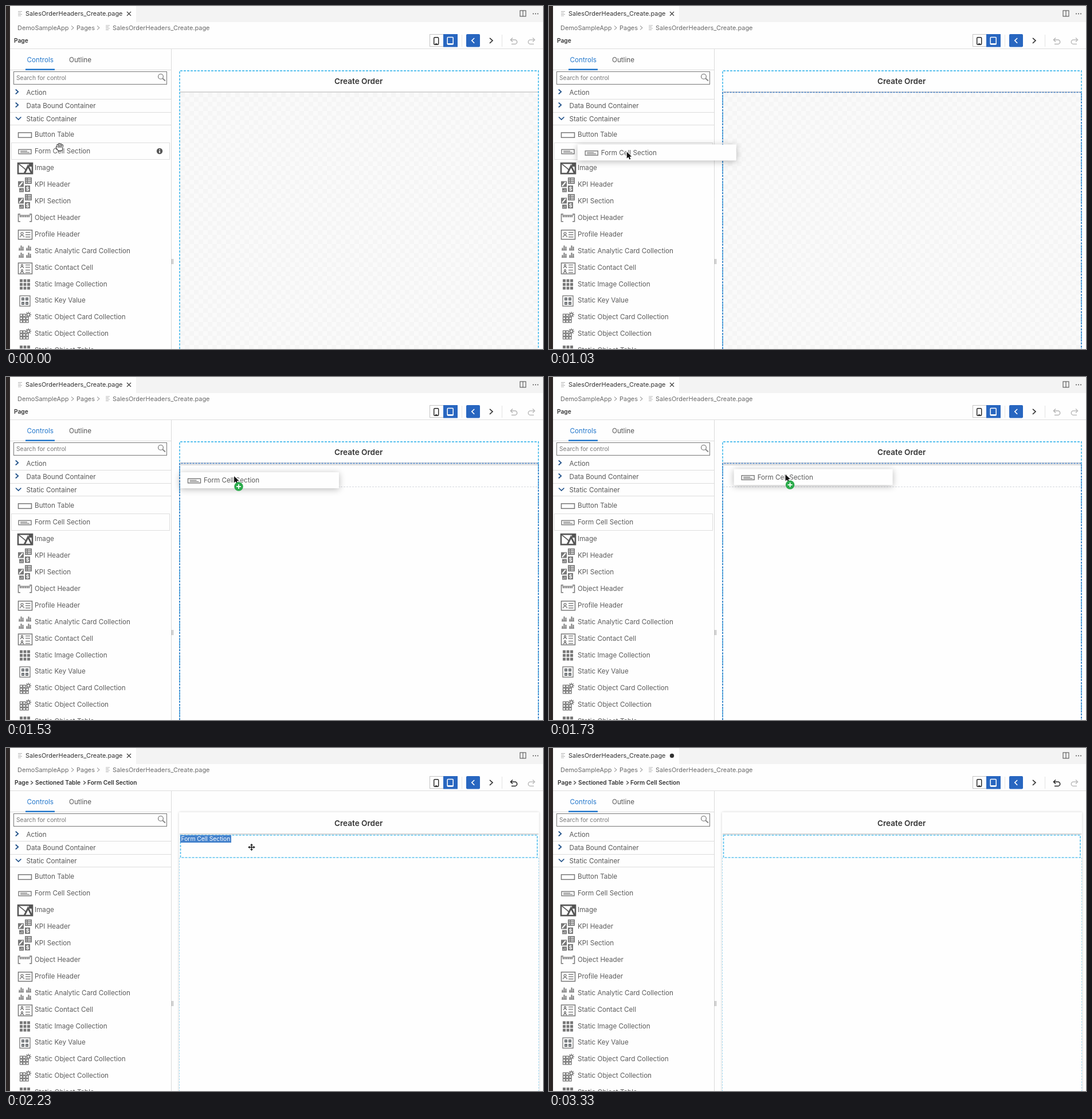
An HTML page with a canvas that plays this animation: 937 px wide and 598 px high, repeating every 3430 ms.

```html
<!DOCTYPE html>
<html lang="en">
<head>
<meta charset="utf-8">
<title>Page designer</title>
<style>
html, body { margin: 0; width: 100%; height: 100%; overflow: hidden; background: #fefefe; }
canvas { display: block; }
</style>
</head>
<body>
<canvas id="stage" width="937" height="598"></canvas>
<script>
const c = document.getElementById('stage').getContext('2d');
const LOOP = 3430, GRAY = '#787878', SKY = '#5cc2ee', BLUE = '#2866c0', LABEL = 11.66;
const T = { grab: 900, target: 930, over: 1430, drop: 2130, dirty: 2830, leave: 3130 };

const items = ['Button Table', 'Form Cell Section', 'Image', 'KPI Header', 'KPI Section',
  'Object Header', 'Profile Header', 'Static Analytic Card Collection', 'Static Contact Cell',
  'Static Image Collection', 'Static Key Value', 'Static Object Card Collection',
  'Static Object Collection', 'Static Object Table'];
const icons = [buttonIcon, formIcon, imageIcon, kpiIcon, kpiIcon, headerIcon, profileIcon,
  chartsIcon, contactIcon, gridIcon, keyIcon, gearGridIcon, gearGridIcon, gridIcon];

// Motion paths: [time, x, y]
const handPath = [[30, 94, 246], [430, 97, 253.5]];
const tipPath = [[860, 95, 252], [1260, 199, 258], [1530, 398, 173], [1930, 427, 167]];
const chipPath = [[860, 9, 239], [1260, 113, 245], [1530, 304, 166], [1930, 341, 155]];

function along(path, t) {
  if (t <= path[0][0]) return path[0].slice(1);
  for (let i = 1; i < path.length; i++) {
    const [t0, x0, y0] = path[i - 1], [t1, x1, y1] = path[i];
    if (t < t1) {
      const k = (t - t0) / (t1 - t0), e = k * k * (3 - 2 * k);
      return [x0 + (x1 - x0) * e, y0 + (y1 - y0) * e];
    }
  }
  return path[path.length - 1].slice(1);
}

function box(x, y, w, h, color) { c.fillStyle = color; c.fillRect(x, y, w, h); }
function frame(x, y, w, h, color, width = 1) {
  c.strokeStyle = color; c.lineWidth = width; c.strokeRect(x, y, w, h);
}
function line(points, color, width = 1, dash = []) {
  c.strokeStyle = color; c.lineWidth = width;
  c.setLineDash(dash);
  c.beginPath();
  for (let i = 0; i < points.length; i += 2) c.lineTo(points[i], points[i + 1]);
  c.stroke();
  c.setLineDash([]);
}
function disc(x, y, r, color) {
  c.fillStyle = color;
  c.beginPath(); c.arc(x, y, r, 0, 7); c.fill();
}
function ring(x, y, r, color, width, from = 0, to = 7) {
  c.strokeStyle = color; c.lineWidth = width;
  c.beginPath(); c.arc(x, y, r, from, to); c.stroke();
}
function text(s, x, mid, size, color, weight = 400) {
  c.font = `${weight} ${size}px Inter, "Liberation Sans", sans-serif`;
  c.fillStyle = color;
  c.fillText(s, x, mid + size * 0.36);
}
function chevron(x, y, w, h, color, width = 1.5) {
  line([x - w / 2, y - h, x + w / 2, y, x - w / 2, y + h], color, width);
}
function rounded(x, y, w, h, r, color) {
  c.fillStyle = color;
  c.beginPath(); c.roundRect(x, y, w, h, r); c.fill();
}

// Control icons, drawn around the origin
function buttonIcon() { frame(-11.5, -3.5, 23, 8.5, GRAY, 1.5); }
function formIcon() {
  frame(-11, -3, 22, 7.5, GRAY, 1.4);
  line([-8, -.2, 4, -.2], GRAY, 1.2);
  line([-8, 2, 8, 2], GRAY, 1.2);
}
function imageIcon() {
  frame(-12, -8, 25, 18, '#555', 2.6);
  box(7, -8, 6, 6, '#555');
  line([-1, 10, 5.5, -3, 12, 10], '#555', 3);
  line([-11, -7, -1, 1, 2, 4], '#555', 1.5);
}
function kpiIcon() {
  box(0, -12, 12, 11, GRAY);
  for (let y = -9.5; y < -2; y += 3) {
    line([1.5, y, 3.5, y], '#fff', 1.3);
    line([5, y, 10.5, y], '#fff', 1.3);
  }
  box(-12, -5.5, 10, 10, GRAY);
  line([-10, 3, -4, -4], '#fff', 2);
  box(0, 2, 9, 11, GRAY);
  text('$', 1.7, 7.5, 9, '#fff', 700);
  box(-10, 6.5, 8, 7, GRAY);
  line([-8, 12, -8, 10], '#fff');
  line([-5, 12, -5, 8.5], '#fff');
}
function headerIcon() {
  line([-8, -6, -11.5, -6, -11.5, 7, -8, 7], GRAY, 1.5);
  line([8, -6, 11.5, -6, 11.5, 7, 8, 7], GRAY, 1.5);
  line([-9, -2, 9, -2], GRAY, 3, [2, 1]);
  line([-10, -4, 10, -4], GRAY, 1);
}
function person(x, y, s = 1) {
  ring(x, y - 2 * s, 2 * s, GRAY, 1.3);
  ring(x, y + 4.5 * s, 3.4 * s, GRAY, 1.3, Math.PI, 2 * Math.PI);
}
function profileIcon() {
  frame(-11.5, -7, 24, 16, GRAY, 1.5);
  person(-5, 1);
  for (const y of [-3, 1, 5]) line([1, y, 9.5, y], GRAY, 1.4);
}
function chartsIcon() {
  for (const x of [-11, 2]) for (const y of [-1, 11.5]) {
    line([x, y, x + 9, y], GRAY, 1.2);
    [4, 8, 6].forEach((h, i) => box(x + .5 + i * 3, y - h, 2, h, GRAY));
  }
}
function contactIcon() {
  frame(-11.5, -7.5, 24, 19, GRAY, 1.5);
  for (const y of [-2, 7]) {
    person(-5, y, .75);
    line([1, y - 2, 9, y - 2], GRAY, 1.3);
    line([1, y + 2, 9, y + 2], GRAY, 1.3);
  }
}
function gridIcon() {
  for (let i = 0; i < 9; i++) box(-9 + i % 3 * 6.5, -8 + (i / 3 | 0) * 6.5, 5, 5, GRAY);
}
function keyIcon() {
  frame(-9, -8, 18, 18, GRAY, 1.3);
  for (const x of [-6, 1]) for (const y of [-5, 2.5]) {
    box(x, y, 5, 5, '#5f6468');
    box(x + 1, y + 2, 3, 1, '#ddd');
  }
}
function gearGridIcon() {
  for (let i = 0; i < 9; i++) {
    if (i !== 2) frame(-8.5 + i % 3 * 5.3, -5 + (i / 3 | 0) * 5.3, 4, 4, GRAY, 1.3);
  }
  for (let a = 0; a < 8; a++) {
    const x = Math.cos(a * Math.PI / 4), y = Math.sin(a * Math.PI / 4);
    line([6 + 3 * x, -4 + 3 * y, 6 + 5.2 * x, -4 + 5.2 * y], GRAY, 1.3);
  }
  ring(6, -4, 2.5, GRAY, 1.5);
}
function icon(draw, x, y) {
  c.save(); c.translate(x, y); draw(); c.restore();
}

function fileIcon(x, y) {
  [7, 5, 7, 5].forEach((w, i) => line([x, y - 4 + i * 2.5, x + w, y - 4 + i * 2.5], '#aaa', .9));
}
function turnArrow(x, y, dir, color) {
  c.save();
  c.translate(x, y); c.scale(dir, 1);
  line([-2, -5.5, -5.5, -2, -2, 1.5], color, 1.5);
  line([-5.5, -2, 2, -2], color, 1.5);
  ring(2, 1.7, 3.7, color, 1.5, -Math.PI / 2, Math.PI / 2);
  line([2, 5.4, -4, 5.4], color, 1.5);
  c.restore();
}

function topBars(t) {
  const dropped = t >= T.drop;
  box(7, 0, 930, 28, '#f3f3f3');
  box(7, 0, 220, 28, '#fefefe');
  fileIcon(21, 13.5);
  text('SalesOrderHeaders_Create.page', 34, 13.5, 10.95, '#333');
  if (t >= T.dirty) disc(214.5, 13.5, 3.7, '#333');
  else {
    line([211, 10, 218, 17], '#444', 1.2);
    line([218, 10, 211, 17], '#444', 1.2);
  }
  frame(897, 8, 10, 10, '#555', 1.1);
  line([902, 8, 902, 18], '#555', 1.1);
  for (let i = 0; i < 3; i++) disc(920 + i * 4, 13.5, 1, '#555');

  text('DemoSampleApp', 20, 38, 10.95, '#6a6a6a');
  chevron(116, 38, 4, 3.5, '#777', 1);
  text('Pages', 123, 38, 10.95, '#6a6a6a');
  chevron(161, 38, 4, 3.5, '#777', 1);
  fileIcon(174, 38);
  text('SalesOrderHeaders_Create.page', 186, 38, 10.95, '#6a6a6a');

  text('Page', dropped ? 15 : 14, 60.5, 10.2, '#333', 600);
  if (dropped) {
    chevron(45, 60.5, 3.5, 3, '#444', 1.2);
    text('Sectioned Table', 51, 60.5, 10.2, '#333', 600);
    chevron(137, 60.5, 3.5, 3, '#444', 1.2);
    text('Form Cell Section', 142, 60.5, 10.2, '#333', 600);
  }

  frame(739.5, 49.5, 48, 21, '#c4c4c4');
  box(763, 49, 25, 22.5, BLUE);
  c.strokeStyle = '#222'; c.lineWidth = 1.4;
  c.beginPath(); c.roundRect(746.7, 54.7, 8, 12.5, 1.5); c.stroke();
  line([749, 66, 752.5, 66], '#222', 1.5);
  c.strokeStyle = '#fff';
  c.beginPath(); c.roundRect(770.2, 54.5, 10, 12.5, 1); c.stroke();
  line([770, 66, 780.5, 66], '#fff', 2);
  line([795.5, 50, 795.5, 71], '#e4e4e4');
  line([865.5, 50, 865.5, 71], '#e4e4e4');
  rounded(803, 49, 24, 22.5, 2, BLUE);
  line([817.2, 56, 812.8, 60.3, 817.2, 64.6], '#fff', 1.6);
  chevron(846.5, 60.3, 5, 4.5, '#333', 1.6);
  turnArrow(886, 61, 1, dropped ? '#222' : '#b5b5b5');
  turnArrow(917, 61, -1, '#bcbcbc');
  line([7, 74.5, 937, 74.5], '#dedede');
}

function sidebar(t) {
  line([288.5, 75, 288.5, 598], '#d9d9d9');
  line([289.5, 441, 289.5, 450], '#aaa');
  line([291.5, 441, 291.5, 450], '#aaa');
  text('Controls', 36.5, 93.5, LABEL, '#2478cc');
  text('Outline', 110, 93.5, LABEL, '#555');
  line([7, 111.5, 288, 111.5], '#dcdcdc');
  box(34, 109.5, 51, 2.5, '#2478cc');

  frame(13.5, 114.5, 267, 22, '#777');
  text('Search for control', 18, 125.5, 10.25, '#777');
  ring(270, 123, 4.4, '#888', 1.4);
  line([273.2, 126.2, 278, 130.5], '#888', 2);

  ['Action', 'Data Bound Container', 'Static Container'].forEach((s, i) => {
    const y = 151 + i * 23, rule = Math.floor(162.5 + i * 22.7) + .5;
    text(s, 35.5, y, LABEL, '#585858');
    line([7, rule, 288, rule], '#dcdcdc');
    if (i < 2) chevron(19, y - 1.5, 4.5, 4, '#1f5088', 1.7);
  });
  line([17, 193.5, 21.7, 198, 26.4, 193.5], '#1f5088', 1.7);

  if (t < T.drop) frame(9.5, 238.5, 276, 29, '#dedede');
  if (t < T.over) {
    disc(268, 253, 5.2, '#555');
    box(267.2, 252.2, 1.7, 4, '#fff');
    box(267.2, 249.6, 1.7, 1.6, '#fff');
  }
  items.forEach((s, i) => {
    const y = 224.3 + i * 28.9;
    icon(icons[i], 33, y);
    text(s, 50, y, LABEL, '#5c5c5c');
  });
}

function canvasPage(t) {
  const dropped = t >= T.drop;
  if (dropped) {
    c.save();
    c.shadowColor = 'rgba(0,0,0,.18)'; c.shadowBlur = 4;
    box(302, 112, 628, 500, '#fefefe');
    c.restore();
  } else if (t < T.over) {
    box(304, 151, 624, 447, '#fafafa');
    c.fillStyle = '#f5f5f5';
    for (let y = 0; y < 56; y++) for (let x = y % 2; x < 78; x += 2) {
      c.fillRect(304 + x * 8, 151 + y * 8, 8, 8);
    }
  }
  text('Create Order', 573, 131, 13.55, '#333', 600);
  line([303, 150, 929, 150], '#c9c9c9', 1.4);

  if (dropped) {
    line([302.5, 191, 302.5, 598], '#a9dcf2', 1, [3, 2]);
    line([929.5, 191, 929.5, 598], '#a9dcf2', 1, [3, 2]);
    c.setLineDash([4, 2]);
    frame(304.5, 152, 622.5, 39, SKY, 1.7);
    c.setLineDash([]);
    if (t < T.leave) {
      box(304, 152, 89, 13, '#4482cc');
      text('Form Cell Section', 305.5, 158.5, 10.3, '#fff');
    }
    return;
  }
  line([303, 598, 303, 113, 929, 113, 929, 598], SKY, 1.8, [4, 2]);
  if (t >= T.target) line([303, 598, 303, 150.5, 929, 150.5, 929, 598], '#3b78c2', 1.5, [3, 2]);
  if (t >= T.over) {
    line([304, 153, 928, 153], '#b5b5b5');
    line([304, 191.5, 928, 191.5], '#d5d8de', 1, [3, 2]);
  }
}

function dragChip(x, y) {
  c.save();
  c.shadowColor = 'rgba(0,0,0,.28)'; c.shadowBlur = 12; c.shadowOffsetY = 2;
  box(x, y, 277, 28, '#fefefe');
  c.restore();
  icon(formIcon, x + 24.5, y + 14.3);
  text('Form Cell Section', x + 41, y + 14.3, LABEL, '#5c5c5c');
}

function hand(x, y) {
  c.save();
  c.translate(x, y);
  c.lineCap = c.lineJoin = 'round';
  for (const [color, grow] of [['#333', 2], ['#fff', 0]]) {
    [[-4, -3.5], [-1.2, -5.2], [1.6, -4.8], [4.3, -3]].forEach(([fx, fy]) =>
      line([fx, fy, fx * .75, 2], color, 1.6 + grow));
    line([-5.6, .5, -2.5, 4.5], color, 1.6 + grow);
    line([-1.5, 3.5, 2, 3.5], color, 4.5 + grow);
  }
  for (const gap of [-2.4, .2, 2.7]) line([gap, -3, gap * .9, .5], '#333', .8);
  c.restore();
}

function arrow(x, y) {
  c.save();
  c.translate(x, y);
  c.beginPath();
  for (const p of [[0, 0], [0, 11.5], [2.7, 9], [4.6, 13.2], [6.6, 12.3], [4.8, 8.3], [8.4, 8.1]]) c.lineTo(...p);
  c.closePath();
  c.strokeStyle = '#fff'; c.lineWidth = 1.6; c.stroke();
  c.fillStyle = '#111'; c.fill();
  c.restore();
}

function plusBadge(x, y) {
  disc(x, y, 7.8, '#2cab4c');
  line([x - 4, y, x + 4, y], '#fff', 1.8);
  line([x, y - 4, x, y + 4], '#fff', 1.8);
}

function moveCursor(x, y) {
  c.save();
  c.translate(x, y);
  for (let i = 0; i < 4; i++) {
    c.rotate(Math.PI / 2);
    line([0, 0, 0, -4.5], '#222', 1.6);
    c.fillStyle = '#222';
    c.beginPath(); c.moveTo(0, -6.3); c.lineTo(2.6, -3.2); c.lineTo(-2.6, -3.2); c.fill();
  }
  c.restore();
}

function pointer(t) {
  if (t < T.grab) hand(...along(handPath, t));
  else if (t < T.drop) {
    const [x, y] = along(tipPath, t);
    dragChip(...along(chipPath, t));
    arrow(x, y);
    if (t >= T.over) plusBadge(x + 8, y + 18);
  } else if (t < T.leave) moveCursor(428.5, 173);
}

function draw(now) {
  const t = now % LOOP;
  box(0, 0, 937, 598, '#fefefe');
  box(0, 0, 7, 598, '#2c2625');
  topBars(t);
  sidebar(t);
  canvasPage(t);
  pointer(t);
  requestAnimationFrame(draw);
}
draw(0);
</script>
</body>
</html>
```
